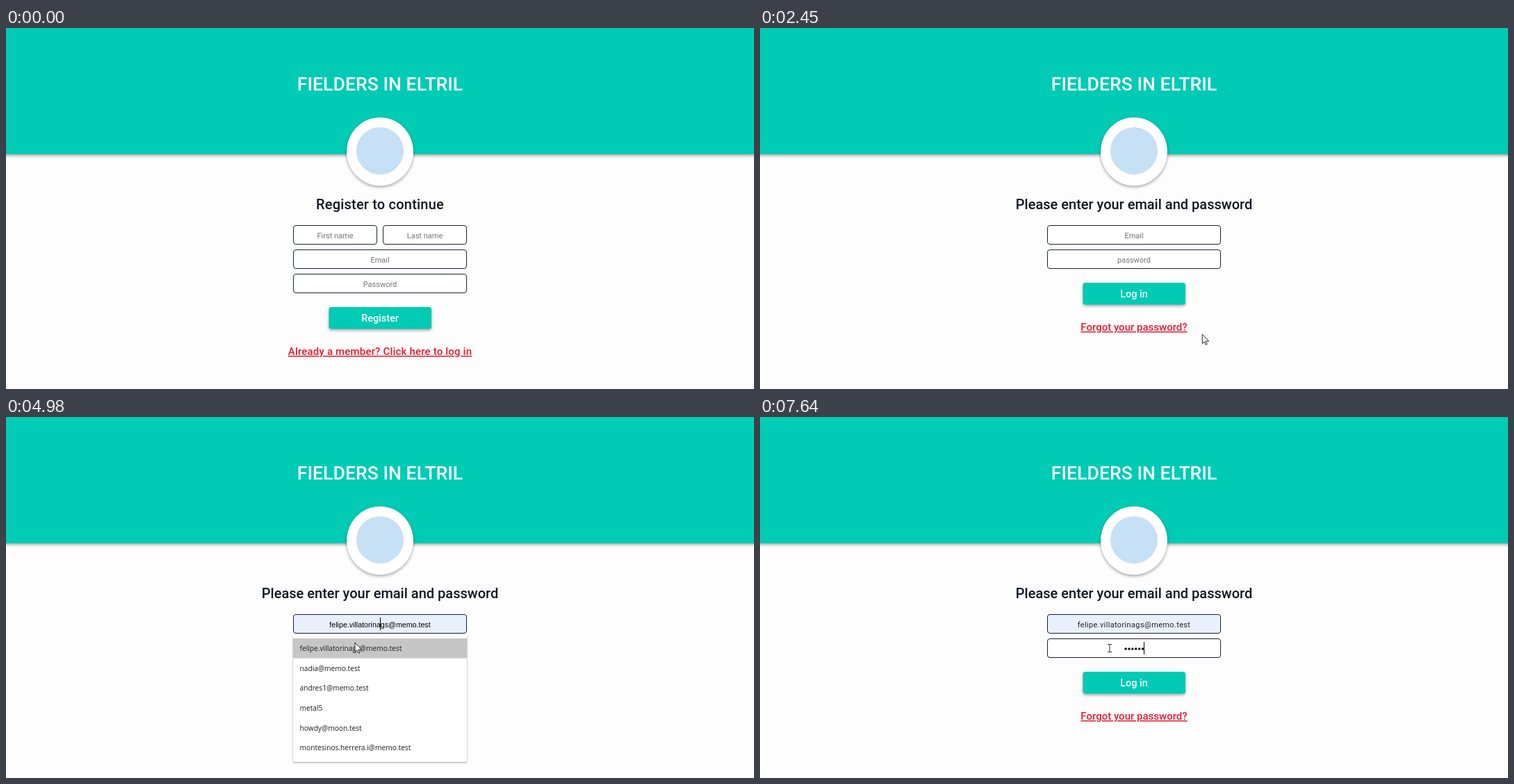
Animation, 1076 px wide and 520 px high, one loop 8 s. Source, as an HTML page:

```html
<!DOCTYPE html>
<html lang="en">
<head>
<meta charset="utf-8">
<title>Sign in</title>
<style>
html, body { margin: 0; width: 100%; height: 100%; overflow: hidden; background: #fdfdfd; }
svg { display: block; width: 1076px; height: 520px; }
text { font-family: Roboto, sans-serif; text-anchor: middle; white-space: pre; }
.head { font-size: 20px; font-weight: 500; fill: #101722; }
.link { font-size: 15px; font-weight: 500; fill: #e31b2e; text-decoration: underline; text-decoration-thickness: 1px; text-underline-offset: 2px; }
.hint { font-size: 11px; fill: #757575; }
.label { font-size: 14.4px; font-weight: 500; fill: #fff; }
.list { font: 500 10.2px "Open Sans", sans-serif; fill: #1d1d1d; text-anchor: start; }
.box { fill: #fff; stroke: #1a2230; }
.soft { filter: drop-shadow(0 2px 2px rgba(0,0,0,.35)); }
.caret { fill: #000; }
.hide { display: none; }
</style>
</head>
<body>
<svg id="stage" viewBox="0 0 1076 520"></svg>
<script>
const TEAL = '#00cbb4';
const MAIL = 'felipe.villatorinags@memo.test';
const MAILS = [MAIL, 'nadia@memo.test', 'andres1@memo.test', 'metal5', 'howdy@moon.test', 'montesinos.herrera.i@memo.test'];

const text = (cls, x, y, s, extra = '') => `<text class="${cls}" x="${x}" y="${y}" ${extra}>${s}</text>`;
const box = (x, y, w, id = '') => `<rect ${id && `id="${id}"`} class="box" x="${x + .5}" y="${y - .5}" width="${w - 1}" height="27" rx="3.5"/>`;
const field = (x, y, w, hint) => box(x, y, w) + text('hint', x + w / 2, y + 17.5, hint);
const button = (y, s) => `<rect class="soft" x="464.5" y="${y}" width="147.5" height="31.5" rx="3.5" fill="${TEAL}"/>` + text('label', 538, y + 21, s);
const caret = (id, y) => `<rect id="${id}" class="caret" y="${y}" width="1" height="18"/>`;

document.getElementById('stage').innerHTML = `
<rect width="1076" height="520" fill="#fdfdfd"/>
<rect class="soft" x="-5" y="-5" width="1086" height="187" fill="${TEAL}"/>
${text('', 538, 90, 'FIELDERS IN ELTRIL', 'font-size="26.7" font-weight="500" fill="#fff"')}
<ellipse class="soft" cx="538" cy="178" rx="48" ry="49.3" fill="#fff"/>
<circle cx="538" cy="177" r="34" fill="#c6e0f6"/>
<g id="register">
  ${text('head', 538, 261, 'Register to continue', 'letter-spacing=".2"')}
  ${field(413, 285, 121, 'First name')}${field(542, 285, 121, 'Last name')}
  ${field(413, 320, 250, 'Email')}${field(413, 355, 250, 'Password')}
  ${button(402, 'Register')}
  ${text('link', 538, 471, 'Already a member? Click here to log in', 'letter-spacing=".18"')}
</g>
<g id="login">
  ${text('head', 538, 261, 'Please enter your email and password')}
  ${box(413, 285, 250, 'mailBox')}${box(413, 320, 250)}
  ${text('hint', 538, 302.5, 'Email', 'id="mailHint"')}
  ${text('', 538, 302.5, MAIL, 'id="preview" style="font:10.67px \'Liberation Sans\',sans-serif"')}
  ${text('', 538, 302.5, MAIL, 'id="mail" font-size="11" fill="#222" letter-spacing=".35"')}
  ${text('hint', 538, 337.5, 'password', 'id="passHint"')}
  <g id="dots"></g>
  ${button(367, 'Log in')}
  ${text('link', 538, 436, 'Forgot your password?')}
  <g id="menu">
    <rect x="413" y="313" width="250" height="184" rx="2" fill="#fff" style="filter:drop-shadow(0 1px 1px rgba(0,0,0,.4))"/>
    <rect id="hover" x="413" y="319" width="250" height="28.5" fill="#c6c6c6"/>
    ${MAILS.map((m, i) => text('list', 422.5, 337 + i * 28.67, m)).join('')}
  </g>
  ${caret('mailCaret', 289)}${caret('passCaret', 324)}
</g>
<g id="status">
  <path d="M-2 504.5H133Q136.5 504.5 136.5 508V522H-2Z" fill="#fff" stroke="#cfd1d4"/>
  ${text('list', 131, 516.7, 'localhost:8080/welcome#/login', 'style="font-size:9.2px;font-weight:400;fill:#5f6368;text-anchor:end"')}
</g>
<g id="cursor">
  <circle id="press" cx="-.5" r="9.7" fill="#ffff00" opacity=".62"/>
  <path id="arrow" d="M0 0V13.5L3 10.7 5 15.2 7 14.3 5 10H9.4Z" fill="#fff" stroke="#111" stroke-width=".9"/>
  <path id="hand" d="M-1.5.8Q0-.8 1.5.8V6Q3 5 4 6.4 5.5 5.8 6.3 7 8 6.6 8.3 8.5V12Q8 14 6.8 16H-.5Q-2 12.8-4.6 10.2-5 7.8-1.5 9.2Z" fill="#fff" stroke="#111" stroke-width=".9"/>
  <path id="beam" d="M-3-5.5H-.7L0-5 .7-5.5H3M0-5V5M-3 5.5H-.7L0 5 .7 5.5H3" fill="none" stroke="#222"/>
</g>`;

const $ = id => document.getElementById(id);
const show = (id, on) => $(id).classList.toggle('hide', !on);
const within = (t, a, b) => t >= a && t < b;

// Pointer moves: first step, last step, number of steps, end point
const MOVES = [
  [770, 1540, 11, 687, 472], [1610, 1910, 5, 664, 466],
  [2450, 2920, 7, 521, 338], [2990, 3240, 4, 506, 303],
  [4980, 4980, 1, 502, 325], [5050, 5050, 1, 503, 330], [6000, 6000, 1, 503, 333]
];
const KEYS = [6780, 7030, 7200, 7260, 7510, 7640];

function pointer(t) {
  let x = 988, y = 510;
  for (const [a, b, n, ex, ey] of MOVES) {
    if (t < a) break;
    const k = Math.min(n, 1 + Math.floor((t - a) / (b - a || 1) * (n - 1) + 1e-6));
    const p = n > 1 ? 1 - (1 - k / n) ** 1.4 : 1;
    x += (ex - x) * p;
    y += (ey - y) * p;
  }
  return [x, y];
}

function shape(t, x, y) {
  if (t < 2140) return x < 671 ? 'hand' : 'arrow';
  if (t < 2920) return y < 347 ? 'beam' : within(y, 367, 398) && x < 612 ? 'hand' : 'arrow';
  return within(t, 4980, 5530) ? 'arrow' : 'beam';
}

function draw(t) {
  const [x, y] = pointer(t), kind = shape(t, x, y);
  show('cursor', t >= 770);
  $('cursor').setAttribute('transform', `translate(${x} ${y})`);
  for (const k of ['arrow', 'hand', 'beam']) show(k, k === kind);
  show('press', within(t, 3640, 3790) || within(t, 5450, 5530) || within(t, 6080, 6150));

  show('register', t < 2220);
  show('login', t >= 2220);
  show('status', within(t, 2060, 2450));
  show('menu', within(t, 3710, 5530));
  show('hover', t >= 4980);
  show('mailHint', t < 4980);
  show('preview', within(t, 4980, 5530));
  show('mail', t >= 5530);
  $('mailBox').style.fill = t < 4980 ? '#fff' : '#e8f0fe';

  show('mailCaret', within(t, 3640, 4200) || within(t, 4670, 6000));
  $('mailCaret').setAttribute('x', t < 5530 ? 538 : 619);

  const n = KEYS.filter(k => t >= k).length;
  show('passHint', !n);
  $('dots').innerHTML = Array.from({ length: n }, (_, i) =>
    `<circle cx="${538.3 + (i - (n - 1) / 2) * 4.9}" cy="334" r="1.8" fill="#111"/>`).join('');
  show('passCaret', within(t, 6080, 6630) || n);
  $('passCaret').setAttribute('x', Math.floor(538 + n * 2.45));
}

const start = performance.now();
function frame() {
  draw((performance.now() - start) % 8000);
  requestAnimationFrame(frame);
}
frame();
</script>
</body>
</html>
```
